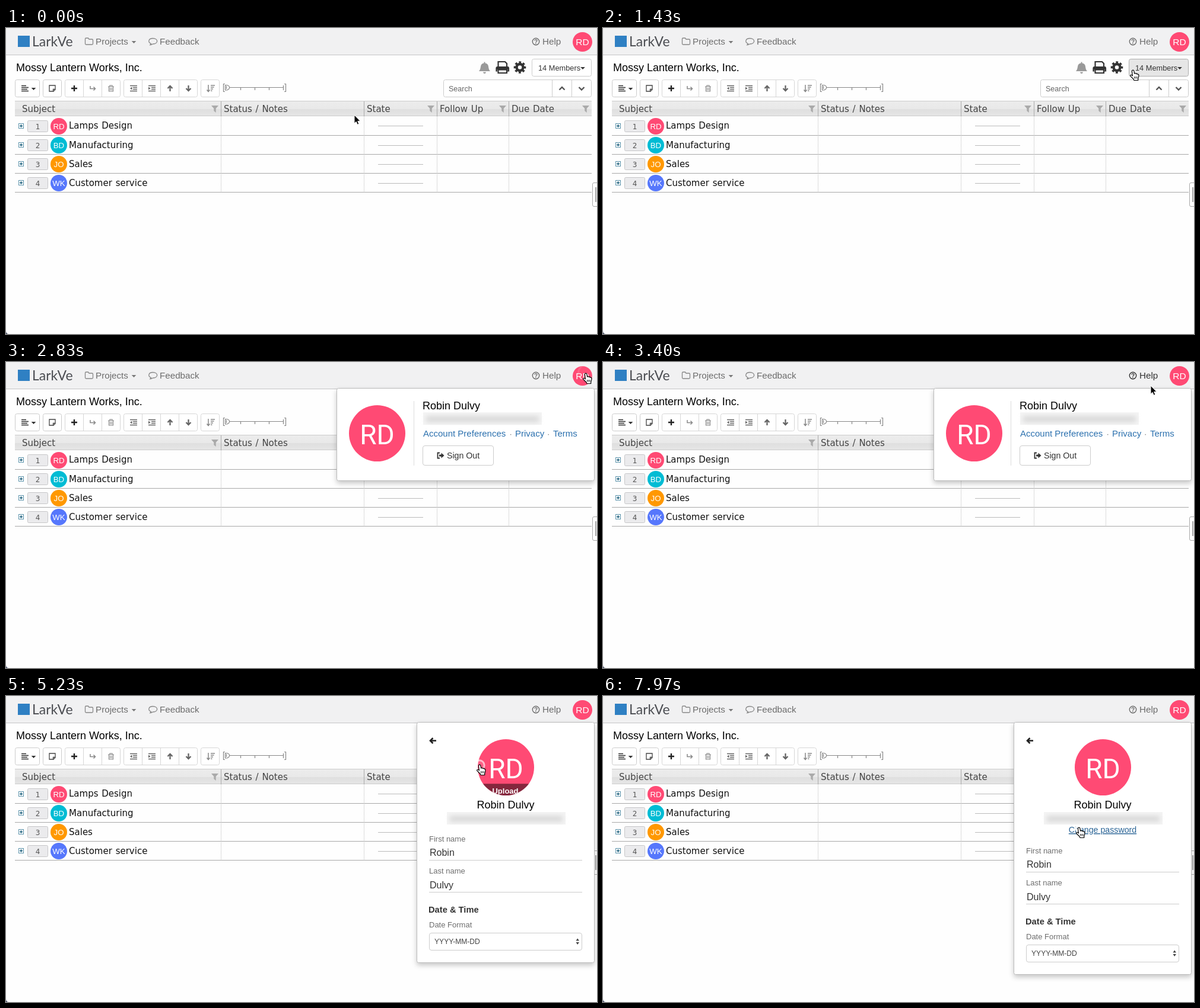
These frames come from a looping animation (996 by 517 pixels, 8000 ms). An HTML page:

```html
<!DOCTYPE html>
<html lang="en">
<head>
<meta charset="utf-8">
<title>Account panel</title>
<style>
html, body { margin: 0; width: 100%; height: 100%; overflow: hidden; background: #fefefe; }
svg { display: block; width: 996px; height: 517px; }
text { font-family: "Liberation Sans", Arial, sans-serif; white-space: pre; }
.grid { font-family: "DejaVu Sans", Verdana, sans-serif; font-size: 15px; word-spacing: 1px; }
.mid { text-anchor: middle; }
.white { fill: #fff; }
.big { font: 400 46px Roboto, "Liberation Sans", sans-serif; fill: #fff; text-anchor: middle; }
.nav { font-size: 15.2px; fill: #6c6c6c; }
.name { font-size: 18px; }
.link { font-size: 15px; fill: #2b70ae; }
.label { font-size: 13px; fill: #6e6e6e; }
.value { font-size: 16px; fill: #333; }
.line { fill: none; stroke: #ccc; }
.ico { fill: none; stroke: #444; stroke-width: 2; }
.dim { stroke: #888; }
.btn { fill: #fff; stroke: #ccc; }
.panel { filter: drop-shadow(0 4px 4px rgba(0, 0, 0, .22)); }
.panel > .box { fill: #fff; stroke: #bbb; }
</style>
</head>
<body>
<svg viewBox="0 0 996 517" xmlns="http://www.w3.org/2000/svg">
  <defs>
    <linearGradient id="head" x2="0" y2="1">
      <stop offset="0" stop-color="#ececec"/><stop offset=".52" stop-color="#e9e9e9"/>
      <stop offset=".56" stop-color="#dfdfdf"/><stop offset="1" stop-color="#e6e6e6"/>
    </linearGradient>
    <filter id="soft" x="-10%" y="-60%" width="120%" height="220%"><feGaussianBlur stdDeviation="4"/></filter>
    <clipPath id="round"><circle cx="842.5" cy="120.5" r="47.5"/></clipPath>
    <path id="funnel" d="M-6-6H6L1.7-1V6L-1.7 3V-1Z" fill="#aaa"/>
    <path id="caret" d="M-3.8-2H3.8L0 2Z"/>
    <g id="mail">
      <rect width="200" height="21" fill="#f4f4f4"/>
      <rect x="5" y="7" width="190" height="9" fill="#d6d6d6" filter="url(#soft)"/>
    </g>
  </defs>

  <rect width="996" height="517" fill="#fefefe"/>
  <rect width="996" height="45" fill="#f1f1f2"/>
  <path d="M0 45.5H996" stroke="#c4c4c6"/>
  <path d="M0 512Q0 517 5 517H0Z" fill="#3c4660"/>

  <rect x="20" y="13" width="20" height="19" fill="#2f80c3"/>
  <text x="44" y="31" style="font:23px Lato,sans-serif" fill="#4b4d52">LarkVe</text>
  <path d="M133.5 18.5Q133.5 17 135 17H138.5L140 19H145Q146.5 19 146.5 20.5V26.5Q146.5 28 145 28H135Q133.5 28 133.5 26.5Z" class="ico dim" style="stroke-width:1.3"/>
  <text x="151" y="28" class="nav">Projects</text>
  <use href="#caret" x="215.5" y="24" fill="#777"/>
  <path d="M243 28.5C244 27.5 244.5 27 244.6 26.5C238.5 24 240 17.5 247.5 17.5C257 17.5 257 27 247.5 27C246 28 245 28.5 243 28.5Z" class="ico dim" style="stroke-width:1.3"/>
  <text x="259" y="28" class="nav">Feedback</text>
  <g id="help">
    <circle id="helpRing" cx="893" cy="23" r="5.7" fill="none" stroke-width="1.4"/>
    <text x="893" y="26.5" class="mid" font-size="10" font-weight="bold">?</text>
    <text x="904" y="28" font-size="15.2">Help</text>
  </g>
  <circle cx="971.5" cy="23.5" r="16.5" fill="#ff4a74"/>
  <text x="971.5" y="29" class="mid white" font-size="15.5">RD</text>

  <text x="17" y="73" class="name">Mossy Lantern Works, Inc.</text>
  <path d="M797 73C800 70 799.5 66 800.5 63Q802 59.5 805.5 59.5V57.5H807.5V59.5Q811 59.5 812.5 63C813.5 66 813 70 816 73ZM804 74.5H809Q808.5 77 806.5 77T804 74.5Z" fill="#999"/>
  <path d="M829.5 65V57H841L844 60V65M828 72.5H826.5V68Q826.5 66 828.5 66H845Q847 66 847 68V72.5H844M829.5 70.5H844V76H829.5Z" class="ico" style="stroke:#333;stroke-width:2.2"/>
  <rect x="827" y="65.5" width="20" height="5" fill="#333"/>
  <g transform="translate(866 66.5)" fill="none" stroke="#333">
    <circle r="5.5" stroke-width="4.5"/><circle r="8.6" stroke-width="3.4" stroke-dasharray="3.7 3.054" stroke-dashoffset="1.85"/>
  </g>
  <rect id="members" x="886.5" y="52.5" width="100" height="29" rx="3"/>
  <text x="897" y="71.5" font-size="12.8" fill="#333">14 Members</text>
  <use href="#caret" x="972" y="68" fill="#333"/>

  <g id="bar"></g>
  <path d="M26 97.5H34M26 100.5H38M26 103.5H36M26 106.5H38" class="ico" style="stroke:#333;stroke-width:1.7"/>
  <use href="#caret" x="46.5" y="103" fill="#333"/>
  <path d="M73 97H83V104L80 107H73ZM83 103.5H79.5V107" class="ico" style="stroke-width:1.3"/>
  <path d="M110 102H120M115 97V107" class="ico" style="stroke:#222;stroke-width:2.4"/>
  <path d="M142 98V102.5H150M147.5 99.5L150.5 102.5L147.5 105.5" class="ico dim" style="stroke-width:1.5"/>
  <path d="M172 99H182M175 98.5V97H179V98.5M173.5 99.5V107H180.5V99.5M175.7 101V105.5M178.3 101V105.5" class="ico dim" style="stroke-width:1.2"/>
  <path d="M209 97.5H221M214 100.5H221M214 103.5H221M209 106.5H221M240 97.5H252M245 100.5H252M245 103.5H252M240 106.5H252" class="ico" style="stroke:#666;stroke-width:1.6"/>
  <path d="M212.5 99.5V104.5L209 102ZM240 99.5V104.5L243.5 102Z" fill="#666"/>
  <path d="M276.5 107V98M272.5 102L276.5 98L280.5 102M307.5 97V106M303.5 102L307.5 106L311.5 102" class="ico" style="stroke:#666;stroke-width:2.3"/>
  <path d="M341 96V107M338.5 104.5L341 107.5L343.5 104.5M345 97H352M345 100H350.5M345 103H349M345 106H347.5" class="ico dim" style="stroke-width:1.5"/>
  <path d="M369 94.5H366.5V107.5H369M469 94.5H471.5V107.5H469M377 100.5H467.5M395.5 101V105M419.5 101V105M443.5 101V105M467.5 97V105M369.5 96.5H372Q376.5 97 376.5 100.5T372 105H369.5ZM371.5 98V103" class="ico dim" style="stroke-width:1.2"/>
  <text x="746" y="107" font-size="12.5" fill="#666">Search</text>
  <path d="M932.5 104.5L937 100L941.5 104.5M965.5 100L970 104.5L974.5 100" class="ico" style="stroke:#555;stroke-width:2.4"/>

  <g id="table"></g>
  <path d="M997 261.5H991Q988.5 261.5 988.5 264V299Q988.5 301.5 991 301.5H997" class="btn" style="stroke:#aaa"/>
  <path d="M994 269V294" stroke="#888" stroke-width="1.5"/>

  <g id="menu" class="panel">
    <rect class="box" x="557.5" y="44.5" width="434" height="156" rx="3"/>
    <circle cx="625.5" cy="120.5" r="47.5" fill="#ff4a74"/>
    <text x="625.5" y="138.5" class="big">RD</text>
    <path d="M687.5 66V175" stroke="#ddd"/>
    <text x="702" y="80" class="name">Robin Dulvy</text>
    <use href="#mail" x="703" y="85"/>
    <text id="prefs" x="703" y="126" class="link">Account Preferences</text>
    <text x="848.5" y="126" class="label">·</text>
    <text x="858" y="126" class="link">Privacy</text>
    <text x="912" y="126" class="label">·</text>
    <text x="922" y="126" class="link">Terms</text>
    <rect x="702.5" y="141.5" width="119" height="33" rx="3.5" class="btn"/>
    <path d="M731 153.5H727.5V162.5H731" class="ico" style="stroke:#333;stroke-width:1.8"/>
    <path d="M730 156.5H733.5V153.5L738.5 158L733.5 162.5V159.5H730Z" fill="#333"/>
    <text x="743" y="163" font-size="14.2" fill="#333">Sign Out</text>
  </g>

  <g id="account" class="panel">
    <rect id="sheet" class="box" x="692.5" y="44.5" width="299" height="406" rx="3"/>
    <path d="M725 75.5H715M719.5 71L715 75.5L719.5 80" class="ico" style="stroke:#222;stroke-width:2.6"/>
    <circle cx="842.5" cy="120.5" r="47.5" fill="#ff4a74"/>
    <text x="842.5" y="138.5" class="big">RD</text>
    <g clip-path="url(#round)"><g id="upload">
      <rect x="795" y="140" width="95" height="29" fill="#000" fill-opacity=".48"/>
      <text x="841.5" y="157" class="mid white" font-size="13" font-weight="bold">Upload</text>
    </g></g>
    <text x="842" y="190" class="mid name">Robin Dulvy</text>
    <use href="#mail" x="743" y="196"/>
    <text id="change" x="842" y="231" class="link mid" style="font-size:14.2px">Change password</text>
    <g id="form">
      <text x="713" y="246" class="label">First name</text>
      <text x="714" y="270" class="value">Robin</text>
      <text x="713" y="300" class="label">Last name</text>
      <text x="714" y="324.5" class="value">Dulvy</text>
      <path d="M713 277.5H971M713 331.5H971" class="line"/>
      <text x="712" y="366" font-size="14.7" font-weight="bold" fill="#333">Date &amp; Time</text>
      <text x="713" y="391" class="label">Date Format</text>
      <rect x="713.5" y="400.5" width="257" height="29" rx="3.5" class="btn"/>
      <text x="722" y="419" font-size="12.1" fill="#444">YYYY-MM-DD</text>
      <path d="M960.5 413.5L963.2 409.5L966 413.5ZM960.5 416L963.2 420L966 416Z" fill="#444"/>
    </g>
  </g>

  <circle id="ripple" fill="#fff" fill-opacity=".2" stroke="#fff" stroke-width="3"/>
  <g id="cursor">
    <path id="arrow" d="M0 0V14.2L3.2 11.3L5.3 16.2L7.8 15.1L5.7 10.3H10Z" fill="#000" stroke="#fff" stroke-width="1"/>
    <g id="hand" stroke="#000" stroke-width="1.2" stroke-linejoin="round">
      <path d="M-1.6 1.8C-1.6-.4 1.4-.6 1.8 1.5L2.7 6.2C3.3 4.8 5.2 5 5.5 6.6C6.3 5.6 7.8 6 8.1 7.5C9 6.8 10 7.5 9.9 9C10 12 9.2 13 8.7 15V17.5H1.8L1.5 16C0 14-2.6 12-4.2 10.2C-5 8.6-3 7.6-1.6 8.8L-.6 9.8Z" fill="#fff"/>
      <path d="M2.6 11V14.5M4.8 11V14.5M7 11V14.5" fill="none" stroke-width=".9"/>
    </g>
  </g>
</svg>
<script>
const $ = id => document.getElementById(id);
const LOOP = 8000;

// Toolbar groups: left, right, border, inner dividers
const groups = [
  [15, 56, "#ccc"], [62, 93, "#ccc"], [99, 192, "#d6d6d6", 130, 161],
  [198, 322, "#d6d6d6", 229, 260, 291], [328, 359, "#d6d6d6"], [737, 986, "#ccc", 920, 953]
];
$("bar").innerHTML = groups.map(([l, r, color, ...cuts]) =>
  `<rect x="${l + .5}" y="87.5" width="${r - l}" height="29" rx="3" fill="#fff" stroke="${color}"/>` +
  cuts.map(x => `<path d="M${x + .5} 88V116" stroke="${color}"/>`).join("")).join("");

const columns = [["Subject", 27, 352], ["Status / Notes", 367], ["State", 608, 716], ["Follow Up", 731, 837], ["Due Date", 852, 977]];
const rows = [["RD", "Lamps Design", "#ff4a74"], ["BD", "Manufacturing", "#00bcd4"], ["JO", "Sales", "#ff9800"], ["WK", "Customer service", "#5677fc"]];
const cuts = [362.5, 603.5, 726.5, 847.5];

function row([initials, title, color], i) {
  const y = 166 + i * 32;
  const drop = i ? 1 : 0; // the first row sits one pixel higher under the header
  return `<path d="M15 ${y + 15.5}H987" stroke="#a8a8a8"/>
    <rect x="21.5" y="${y - 4.5}" width="8" height="8" fill="#fff" stroke="#5b93ab"/>
    <path d="M23 ${y - .5}H28M25.5 ${y - 3}V${y + 2}" stroke="#1c5f7c" stroke-width="1.3"/>
    <rect x="36.5" y="${y - 9.5}" width="34" height="19" rx="2" fill="#ebebed" stroke="#c6c6c8"/>
    <text x="53.5" y="${y + 4.5}" class="grid mid" style="font-size:12px" fill="#555">${i + 1}</text>
    <circle cx="89" cy="${y}" r="14" fill="${color}"/>
    <text x="89" y="${y + 5}" class="mid white" font-size="13.3">${initials}</text>
    <text x="106" y="${y + 4 + drop}" class="grid" fill="#111">${title}</text>
    <path d="M627 ${y - .5 + drop}H703" stroke="#bbb"/>`;
}

$("table").innerHTML =
  `<rect x="15" y="123" width="972" height="26" fill="url(#head)"/>
   <path d="M15 123.5H987M15 148.5H987" stroke="#ccc"/>` +
  columns.map(([label, x, f]) =>
    `<text x="${x}" y="142" class="grid" fill="#444">${label}</text>` +
    (f ? `<use href="#funnel" x="${f}" y="137"/>` : "")).join("") +
  cuts.map(x => `<path d="M${x} 124V149" stroke="#aaa"/><path d="M${x} 149V278" stroke="#bbb" stroke-dasharray="1 1"/>`).join("") +
  rows.map(row).join("");

// Pointer stops: time, x, y, power of the move into the stop (negative eases out)
const path = [
  [0, 587, 147, 1], [500, 587, 147, 1], [1300, 861, 84, 1.3], [1430, 893, 71, 1], [1970, 977, 19, -1.6],
  [2950, 977, 19, 1], [3400, 923, 40, 1.3], [3770, 842, 77, 1], [4170, 799, 116, -1.5], [5750, 798, 116, 1],
  [5930, 796, 91, 1], [6060, 786, 112, 1], [6200, 775, 145, 1], [6380, 762, 166, 1], [6530, 772, 183, 1],
  [6800, 802, 222, -1.4], [LOOP, 802, 222, 1]
];
const clicks = [[2130, 977, 18], [4930, 798, 117], [7890, 801, 223.5]];
const clamp = u => Math.max(0, Math.min(1, u));

function pointer(t) {
  const i = path.findIndex(p => p[0] > t);
  const [t0, x0, y0] = path[i - 1], [t1, x1, y1, k] = path[i];
  const u = (t - t0) / (t1 - t0);
  const e = k > 0 ? u ** k : 1 - (1 - u) ** -k;
  return [x0 + (x1 - x0) * e, y0 + (y1 - y0) * e];
}

const show = (id, on) => { $(id).style.display = on ? "" : "none"; };

function hoverLink(id, on) {
  $(id).style.textDecoration = on ? "underline" : "none";
  $(id).style.fill = on ? "#2a6496" : "";
}

function render(t) {
  const [x, y] = pointer(t);
  const within = (l, top, r, b) => x >= l && x <= r && y >= top && y <= b;
  const near = (cx, cy, r) => Math.hypot(x - cx, y - cy) < r;
  const menu = t >= 2200 && t < 5060, account = t >= 5060, loaded = t >= 5330;

  const members = !menu && !account && within(886, 52, 987, 82);
  const help = within(886, 0, 940, 45);
  const prefs = menu && within(703, 111, 843, 130);
  const change = loaded && within(785, 215, 899, 234);
  const photo = account && near(842.5, 120.5, 47.5);

  show("menu", menu);
  show("account", account);
  show("change", loaded);
  $("sheet").setAttribute("height", loaded ? 426 : 406);
  $("form").setAttribute("transform", `translate(0 ${loaded ? 20 : 0})`);
  $("members").setAttribute("fill", members ? "#e6e6e6" : "#fff");
  $("members").setAttribute("stroke", members ? "#adadad" : "#ccc");
  $("help").setAttribute("fill", help ? "#333" : "#6c6c6c");
  $("helpRing").setAttribute("stroke", help ? "#333" : "#6c6c6c");
  hoverLink("prefs", prefs);
  hoverLink("change", change);

  const rise = t < 6000 ? clamp((t - 5090) / 200) : 1 - clamp((t - 6220) / 240);
  $("upload").setAttribute("transform", `translate(0 ${28 * (1 - rise)})`);

  const hand = members || prefs || change || photo || near(971.5, 23.5, 17);
  show("hand", hand);
  show("arrow", !hand);
  $("cursor").setAttribute("transform", `translate(${Math.round(x)} ${Math.round(y)})`);

  const click = clicks.find(([start]) => t >= start && t < start + 800);
  show("ripple", click);
  if (click) {
    const age = t - click[0], ring = $("ripple");
    ring.setAttribute("cx", click[1]);
    ring.setAttribute("cy", click[2]);
    ring.setAttribute("r", .47 * Math.sqrt(age));
    ring.setAttribute("opacity", 1 - age / 800);
  }
}

const start = performance.now();
function tick() {
  render((performance.now() - start) % LOOP);
  requestAnimationFrame(tick);
}
tick();
</script>
</body>
</html>
```
